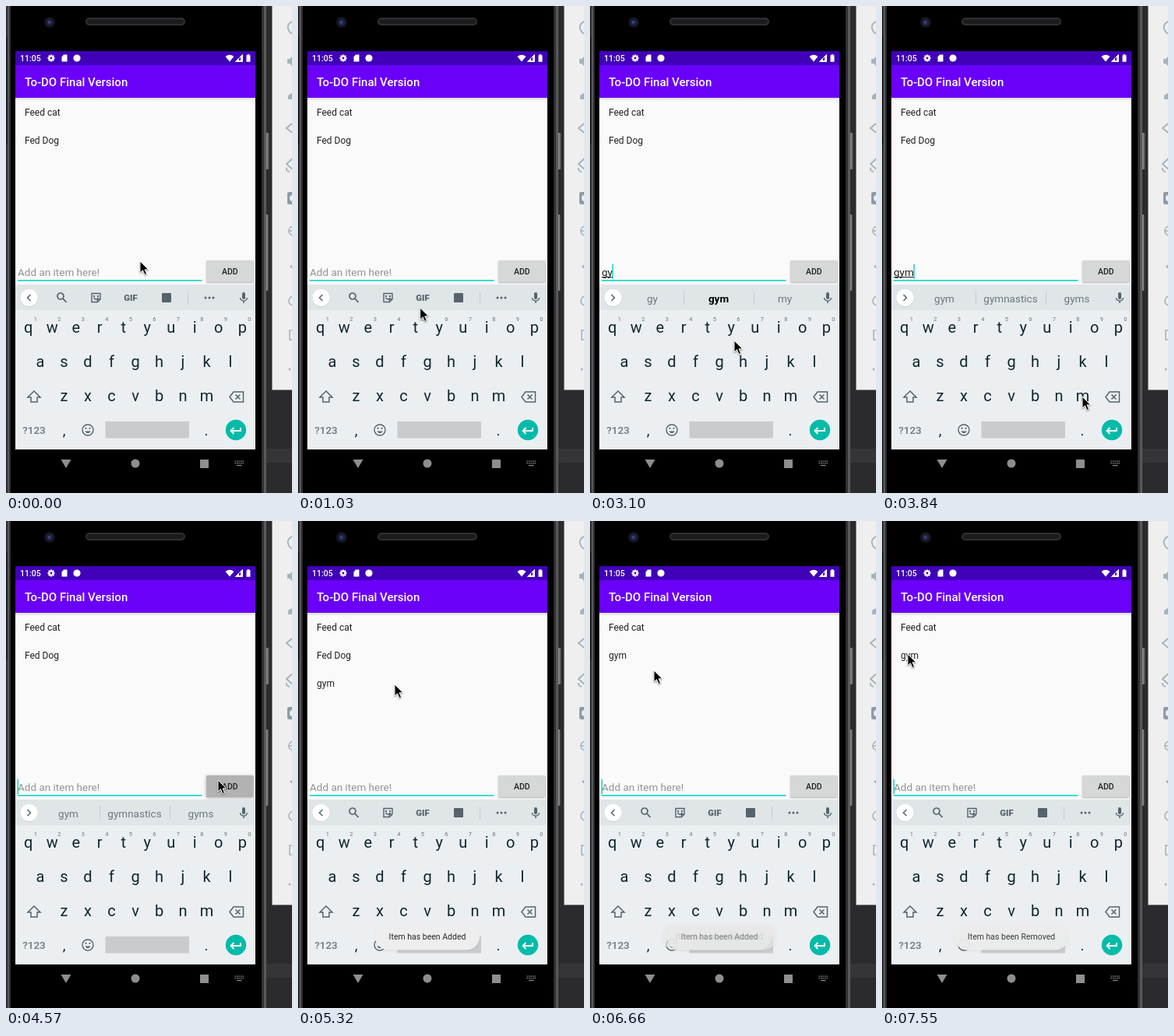
An HTML page with a canvas for the animation above (7.99 s loop, 367 by 626 pixels).

```html
<!DOCTYPE html>
<html lang="en">
<head>
<meta charset="utf-8">
<title>To-do app demo</title>
<style>
  html, body { margin: 0; width: 100%; height: 100%; overflow: hidden; background: #2b2b2d; }
  canvas { display: block; }
</style>
</head>
<body>
<canvas id="stage" width="367" height="626"></canvas>
<script>
const ctx = document.getElementById('stage').getContext('2d');
const LOOP = 7990, STEP = 147.2, LAST_STEP = 51;
const INK = '#12262e', ICON = '#56636b', GREY = '#6c767d', TEAL = '#12d5c4';

const CLICK = { g: 18, y: 20, m: 25, press: 30, clear: 31, added: 32, removed: 42 };
const pointerPath = [
  [0, 172, 328], [4, 172, 330], [6, 164, 364], [9, 142, 436], [11, 129, 461],
  [14, 127, 457], [16, 154, 455], [18, 155, 455], [20, 181, 417], [21, 185, 430],
  [24, 257, 503], [26, 257, 502], [30, 273, 335], [31, 272, 333], [32, 272, 333],
  [33, 262, 324], [36, 124, 210], [38, 66, 175], [42, 66, 175], [45, 82, 192],
  [48, 48, 184], [51, 33, 171]
];

const lerp = (a, b, k) => a + (b - a) * k;
const clamp = v => Math.max(0, Math.min(1, v));

function pointerAt(step) {
  const i = pointerPath.findIndex(p => p[0] >= step);
  if (i < 1) return pointerPath[0].slice(1);
  const [s0, x0, y0] = pointerPath[i - 1], [s1, x1, y1] = pointerPath[i];
  const k = (step - s0) / (s1 - s0);
  return [lerp(x0, x1, k), lerp(y0, y1, k)];
}

function rect(x, y, w, h, fill) {
  ctx.fillStyle = fill;
  ctx.fillRect(x, y, w, h);
}
function round(x, y, w, h, r, fill) {
  ctx.beginPath();
  ctx.roundRect(x, y, w, h, r);
  ctx.fillStyle = fill;
  ctx.fill();
}
function disc(x, y, r, fill) {
  ctx.beginPath();
  ctx.arc(x, y, r, 0, 7);
  ctx.fillStyle = fill;
  ctx.fill();
}
function text(str, x, y, size, fill, align = 'left', weight = 400) {
  ctx.font = `${weight} ${size}px Roboto, sans-serif`;
  ctx.textAlign = align;
  ctx.fillStyle = fill;
  ctx.fillText(str, x, y);
}
function gradient(x0, y0, x1, y1, ...colors) {
  const fill = ctx.createLinearGradient(x0, y0, x1, y1);
  colors.forEach((color, i) => fill.addColorStop(i / (colors.length - 1), color));
  return fill;
}
// Draws SVG path data with its own origin at (x, y).
function shape(d, x, y, fill, stroke, width = 1.4) {
  const path = new Path2D(d);
  ctx.save();
  ctx.translate(x, y);
  if (fill) { ctx.fillStyle = fill; ctx.fill(path); }
  if (stroke) { ctx.strokeStyle = stroke; ctx.lineWidth = width; ctx.stroke(path); }
  ctx.restore();
}

function drawSurroundings() {
  rect(0, 0, 367, 626, '#2b2b2d');
  rect(334, 569, 33, 18, '#353537');
  rect(0, 40, 3, 138, '#1d1d1f');
  rect(341.5, 0, 26, 493.5, '#efefef');
  const tool = '#a5b3ba';
  shape('M8-8Q-4-6-2 2T8 9', 364, 27, null, tool, 1.8);
  shape('M-2-3H1L5-7V7L1 3H-2Z', 363, 71, tool);
  shape('M-1-1L5-5V4H-1Z', 363, 116, tool);
  shape('M8-9L-3 0L8 9M-3 0L3-5', 363, 157, null, tool, 1.9);
  shape('M8-10L-3 0L8 10M-3 5Q-4 9 1 10', 363, 203, null, tool, 1.9);
  round(361, 239, 12, 16, 2, '#8d9da6');
  disc(368, 247, 4, '#efefef');
  shape('M6-6A6 6 0 1 0 6 6M-1 0H6', 363, 289, null, tool, 1.6);
  shape('M6-5L0 0L6 5Z', 364, 335, tool);
  shape('M6-6A6 6 0 1 0 6 6', 363, 379, null, tool, 1.6);
  shape('M7-6H0V6H7', 364, 423, null, tool, 1.6);
  disc(364, 467, 1.5, tool);
}

function drawPhone() {
  const metal = gradient(331, 0, 338, 0, '#3c3c3e', '#8a8a8d', '#4a4a4c');
  round(331, 163, 6.5, 47, 1, metal);
  round(331, 268, 5.5, 98, 1, metal);
  round(2, -30, 332, 690, 28, '#5a5a5d');
  round(4, -30, 327, 690, 26, '#303032');
  round(6, -30, 322, 690, 25, '#000');
  disc(56, 21, 7, '#14151f');
  disc(56, 21, 4, '#20264a');
  disc(55.5, 21, 1.5, '#4a5286');
  round(102, 15, 128, 10, 5, '#303032');
  round(104, 17, 124, 6, 3, '#1c1c1e');
}

function drawHeader() {
  rect(12, 58, 308, 18, '#4000b8');
  rect(12, 76, 308, 42, '#6a00f8');
  text('11:05', 18, 71, 10.5, '#fff', 'left', 500);
  for (let i = 0; i < 4; i++) {
    ctx.save();
    ctx.translate(58, 67);
    ctx.rotate(i * Math.PI / 4);
    rect(-4.5, -1.1, 9, 2.2, '#fff');
    ctx.restore();
  }
  disc(58, 67, 3.5, '#fff');
  disc(58, 67, 1.4, '#4000b8');
  shape('M-3-2L-1-4.5H3.5V4.5H-3.5V-2Z', 75, 67, '#fff');
  disc(91, 67, 4.6, '#fff');
  shape('M-5.5-2Q0-6.5 5.5-2L0 4.5Z', 287, 67, '#fff');
  shape('M4.5-4.5V4.5H-4.5Z', 299, 67, null, '#fff', 1);
  shape('M4.5-4.5V4.5H-4.5L0 0V3H2V-2Z', 299, 67, '#fff');
  shape('M-2.5-3.7H-1.2V-5H1.2V-3.7H2.5V4.8H-2.5Z', 311, 67, '#fff');
  text('To-DO Final Version', 24, 103, 15, '#fff', 'left', 500);
}

function drawApp(step, typed, caretOn) {
  rect(12, 118, 308, 241, '#fafafa');
  rect(12, 118, 308, 4, gradient(0, 118, 0, 122, '#d9d9d9', '#fafafa'));

  const items = ['Feed cat', 'Fed Dog'];
  if (step >= CLICK.added) items.push('gym');
  if (step >= CLICK.removed) items.splice(1, 1);
  items.forEach((item, i) => text(item, 24, 140.5 + i * 36, 12, '#212121'));

  text(typed || 'Add an item here!', 15, 346.5, 13.5, typed ? '#212121' : '#949494');
  const typedWidth = typed ? ctx.measureText(typed).width : 0;
  rect(15, 348, typedWidth, 1, '#212121');
  if (caretOn) rect(14.5 + typedWidth, 332, 1.5, 19, TEAL);
  rect(15, 352, 236.5, 1.6, TEAL);

  const pressed = step >= CLICK.press && step <= CLICK.clear;
  ctx.save();
  ctx.shadowColor = 'rgba(0,0,0,.3)';
  ctx.shadowBlur = pressed ? 4 : 2;
  ctx.shadowOffsetY = 1;
  round(257, 327, 60.5, 28, 1.5, pressed ? '#b2b2b2' : '#d6d7d7');
  ctx.restore();
  text('ADD', 287.3, 344.8, 10.5, '#212121', 'center', 500);
}

function drawSuggestions(words) {
  disc(29.5, 376, 11.3, '#d0d5d9');
  disc(29.5, 375, 11, '#fff');
  shape(words ? 'M-2-4L2 0L-2 4' : 'M2-4L-2 0L2 4', 29.5, 375, null, ICON, 1.5);
  shape('M-2-5Q-2-7 0-7T2-5V0Q2 2 0 2T-2 0Z', 305, 375, ICON);
  shape('M-4.5 0Q-4 4 0 4T4.5 0M0 4V7', 305, 375, null, ICON, 1.4);
  if (words) {
    rect(120, 366, 1, 18, '#c5ccd0');
    rect(210, 366, 1, 18, '#c5ccd0');
    words.forEach((word, i) => {
      const best = word === 'gym' && i === 1;
      text(word, 80 + i * 85, 380.5, 13.5, best ? '#000' : GREY, 'center', best ? 700 : 400);
    });
    return;
  }
  shape('M3-2A4 4 0 1 1 -5-2A4 4 0 1 1 3-2M2 1L6.5 5.8', 71, 375, null, ICON, 1.7);
  shape('M-5.5-5.5H5.5V2L2 5.5H-5.5ZM5.5 2H2V5.5M-3 0Q0 4 3 0', 115.5, 375, null, ICON, 1.4);
  rect(112, 372, 2, 2, ICON);
  rect(117, 372, 2, 2, ICON);
  text('GIF', 160, 379, 11.3, ICON, 'center', 800);
  round(200, 369, 12, 12, 1, ICON);
  rect(233, 367, 1, 17, '#c5ccd0');
  [256, 261, 266].forEach(x => disc(x, 375, 1.5, ICON));
}

function drawKeyRow(letters, baseline, numbered) {
  [...letters].forEach((letter, i) => {
    const x = 166 + (i - (letters.length - 1) / 2) * 30.5;
    text(letter, x, baseline, 20, INK, 'center');
    if (numbered) text((i + 1) % 10, x + 9.2, 405, 7.5, GREY, 'center');
  });
}

function drawKeyboard(words) {
  rect(12, 358, 308, 212, '#ebeff1');
  rect(12, 358, 308, 33, '#e0e5e8');
  drawSuggestions(words);
  drawKeyRow('qwertyuiop', 420, true);
  drawKeyRow('asdfghjkl', 464);
  drawKeyRow('zxcvbnm', 508);
  shape('M0-7L8 1H4V7H-4V1H-8Z', 36, 502, null, ICON, 1.5);
  shape('M-9 0L-4-6.5H8.5V6.5H-4ZM-1.5-3L4.5 3M4.5-3L-1.5 3', 296, 502.5, null, ICON, 1.5);
  text('?123', 36, 550, 13.5, GREY, 'center', 500);
  text(',', 74.5, 552, 19, INK, 'center');
  text('.', 257, 552, 19, INK, 'center');
  shape('M7 0A7 7 0 1 1 -7 0A7 7 0 1 1 7 0', 105, 545, null, ICON);
  shape('M-3.8 1.5Q0 6.8 3.8 1.5Z', 105, 545, ICON);
  disc(102.5, 542.8, 1.1, ICON);
  disc(107.5, 542.8, 1.1, ICON);
  rect(127.5, 534, 107.5, 21.5, '#c8cccf');
  disc(295, 545, 13.2, '#02bba8');
  shape('M6-4V0H-6M-2.5-4L-6.5 0L-2.5 4', 295, 546, null, '#fff', 1.8);
}

function drawNavigation() {
  const nav = '#8e8e8e';
  shape('M-6.5-5H6.5L0 6Z', 77, 588, nav);
  disc(166, 588, 5.5, nav);
  rect(249, 583, 11, 11, nav);
  for (let i = 0; i < 5; i++) {
    rect(293.5 + i * 2.5, 584.5, 1.4, 1.4, nav);
    rect(293.5 + i * 2.5, 587, 1.4, 1.4, nav);
  }
  rect(296, 590, 6.5, 1.2, nav);
}

function drawToast(message, width, opacity) {
  if (opacity <= 0) return;
  ctx.save();
  // The box stays denser than its label while fading.
  ctx.globalAlpha = Math.sqrt(opacity);
  ctx.shadowColor = 'rgba(0,0,0,.08)';
  ctx.shadowBlur = 2;
  ctx.shadowOffsetY = 1;
  round(166 - width / 2, 517, width, 34.5, 17, '#eeeeee');
  ctx.restore();
  ctx.globalAlpha = opacity;
  text(message, 166, 538, 10.5, '#262626', 'center');
  ctx.globalAlpha = 1;
}

function isCaretOn(step) {
  const time = step * 148;
  const phase = start => Math.floor((time - start) / 500) % 2 === 0;
  if (step < CLICK.g) return phase(-1860);
  if (step < CLICK.y) return true;
  if (step < CLICK.m) return phase(CLICK.y * 148);
  if (step < CLICK.clear) return phase(CLICK.m * 148);
  return phase(4540);
}

function drawPointer(x, y) {
  ctx.save();
  ctx.shadowColor = 'rgba(0,0,0,.35)';
  ctx.shadowBlur = 2;
  ctx.shadowOffsetY = 1;
  shape('M0 0V15L3.5 11.7L6 17.5L8.6 16.4L6.1 10.8H10.8Z', x, y, '#000', '#fff', 1);
  ctx.restore();
}

function draw(step) {
  let typed = '', words = null;
  if (step >= CLICK.g) { typed = 'g'; words = ['g', 'good', 'go']; }
  if (step >= CLICK.y) { typed = 'gy'; words = ['gy', 'gym', 'my']; }
  if (step >= CLICK.m) { typed = 'gym'; words = ['gym', 'gymnastics', 'gyms']; }
  if (step >= CLICK.clear) typed = '';
  if (step >= CLICK.added) words = null;

  drawSurroundings();
  drawPhone();
  drawHeader();
  drawApp(step, typed, isCaretOn(step));
  drawKeyboard(words);
  drawNavigation();
  drawToast('Item has been Removed', 147, 0.9 * clamp((step - 44) / 2));
  drawToast('Item has been Added', 134, Math.min(clamp((step - 31) / 3), clamp((46 - step) / 2)));
  drawPointer(...pointerAt(step));
}

function tick() {
  const time = performance.now() % LOOP;
  draw(Math.min(LAST_STEP, Math.floor(time / STEP)));
  requestAnimationFrame(tick);
}
tick();
</script>
</body>
</html>
```
